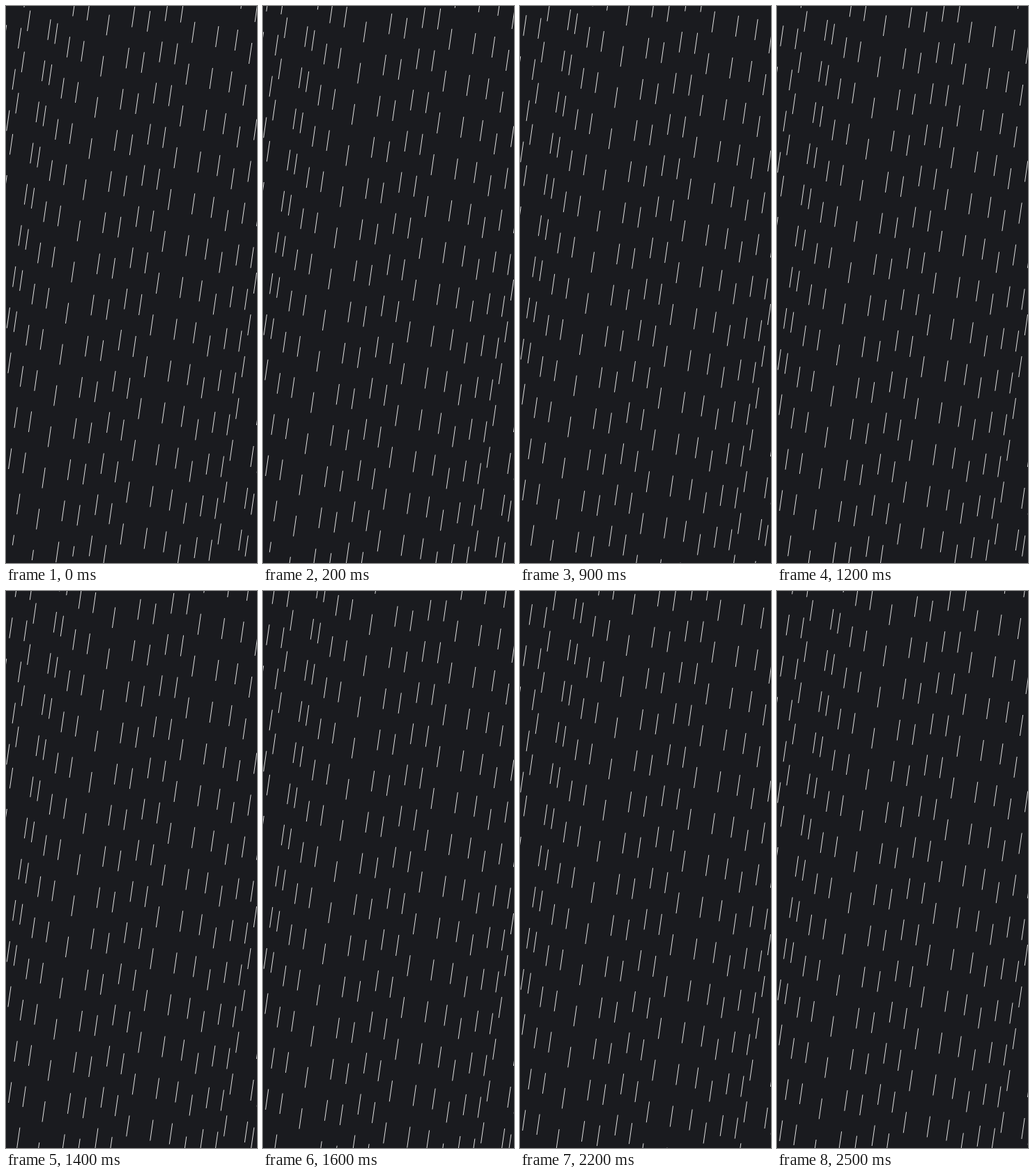
Animation, 360 px wide and 800 px high, one loop 2.6 s. Source, as an HTML page without scripts:

```html
<!DOCTYPE html>
<html lang="en">
<head>
<meta charset="utf-8">
<title>Rain</title>
<style>
  html, body { margin: 0; width: 100%; height: 100%; overflow: hidden; background: #1a1b1f; }
  svg { display: block; width: 100%; height: 100%; }
  .streak { fill: none; stroke: #e2e2e2; stroke-width: 1; stroke-dasharray: 1; }
  .rain { animation: fall 2.6s steps(26) infinite; }
  @keyframes fall { to { transform: translateY(130px); } }
</style>
</head>
<body>
<svg viewBox="0 0 360 800">
  <defs>
    <!-- Dashed columns; the origin is the middle of one dash -->
    <path id="a" class="streak" pathLength="34.5" d="M35.6-251.3L-108.9 768.6"/>
    <path id="b" class="streak" pathLength="40" d="M36.3-255.2L-134.5 945.8"/>
  </defs>
  <g class="rain">
    <use href="#a" x="7" y="-17"/>
    <use href="#a" x="19.6" y="46.3"/>
    <use href="#a" x="32.7" y="21.3"/>
    <use href="#a" x="62" y="34"/>
    <use href="#a" x="72" y="39.6"/>
    <use href="#a" x="89.5" y="59"/>
    <use href="#a" x="118.3" y="5.9"/>
    <use href="#a" x="146.2" y="27.4"/>
    <use href="#a" x="174.3" y="74.8"/>
    <use href="#a" x="204.6" y="22"/>
    <use href="#a" x="222" y="66"/>
    <use href="#b" x="252.5" y="8.6"/>
    <use href="#b" x="268.8" y="37.8"/>
    <use href="#b" x="302.8" y="44"/>
    <use href="#b" x="330.4" y="49"/>
    <use href="#b" x="350.6" y="68"/>
    <use href="#b" x="357.6" y="177.5"/>
    <use href="#b" x="353" y="361.3"/>
    <use href="#b" x="357.4" y="398"/>
    <use href="#b" x="353" y="647"/>
    <use href="#b" x="353.7" y="715.5"/>
  </g>
</svg>
</body>
</html>
```
